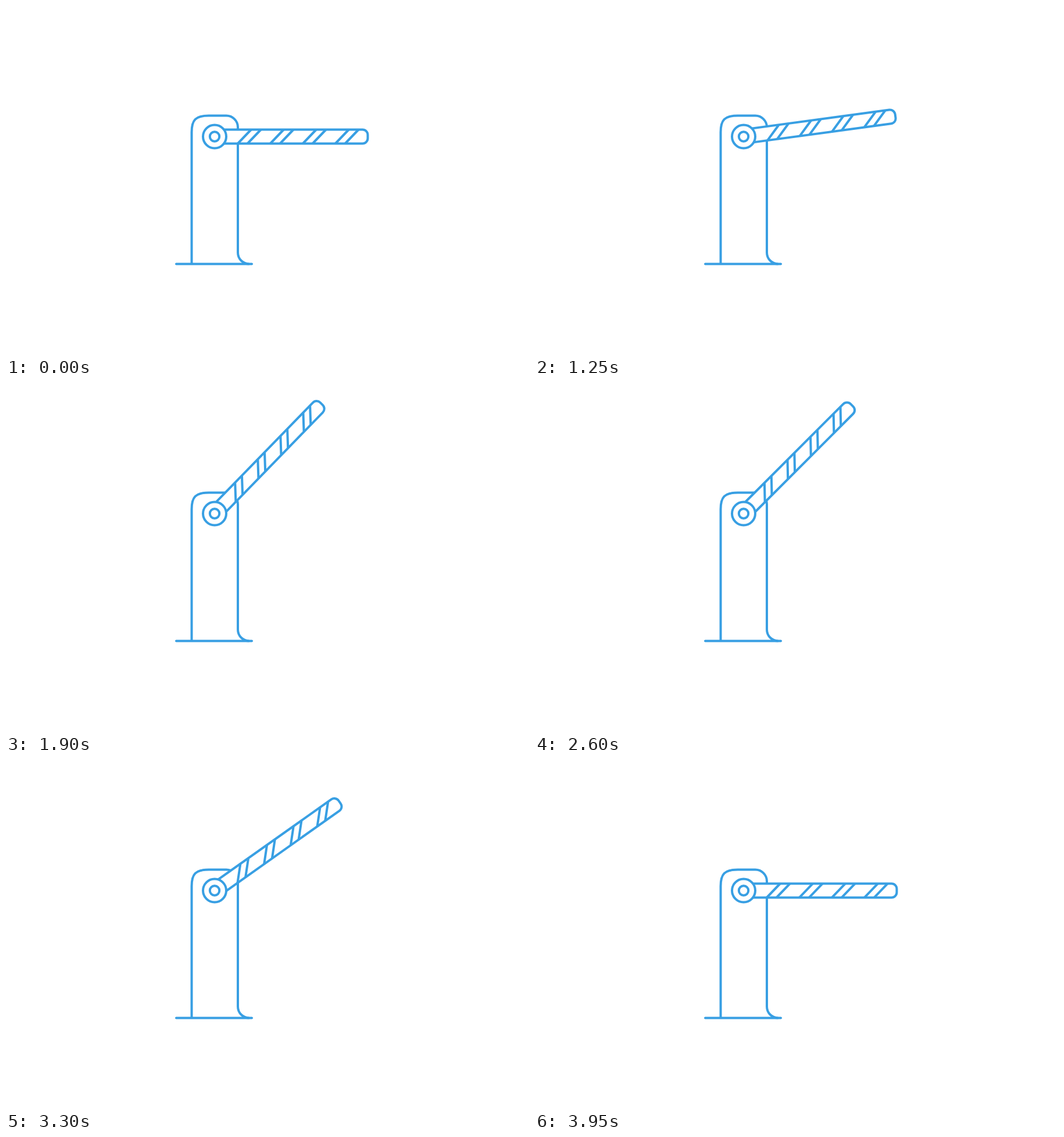
These frames come from a looping animation (900 by 600 pixels, 4.45 s). An HTML page:

```html
<!DOCTYPE html>
<html lang="en">
<head>
<meta charset="utf-8">
<title>Barrier</title>
<style>
  html, body { margin: 0; width: 100%; height: 100%; overflow: hidden; background: #fff; }
  svg { display: block; width: 100%; height: 100%; }
</style>
</head>
<body>
<svg viewBox="0 0 900 600" fill="#fff" stroke="#389fe3" stroke-width="4">
  <path d="M319.5 443.5V217C319.5 196 326 188.5 349 188.5H379A20 20 0 0 1 399 208.5V424A19.5 19.5 0 0 0 418.5 443.5"/>
  <path d="M293 443.5H423" stroke-linecap="round"/>
  <g id="bar">
    <path d="M359 212.5H613.5A9 9 0 0 1 622.5 221.5V227.5A9 9 0 0 1 613.5 236.5H359"/>
    <path id="stripes"/>
  </g>
  <circle cx="359" cy="224.5" r="20"/>
  <circle cx="359" cy="224.5" r="8.2"/>
</svg>
<script>
  const LOOP = 4450, STEP = 50;
  const bar = document.getElementById('bar');

  let stripes = '';
  for (let i = 0; i < 4; i++)
    for (const gap of [0, 16.8]) stripes += `M${398.8 + i * 56 + gap} 236.5l23 -24`;
  document.getElementById('stripes').setAttribute('d', stripes);

  // Easing curve through (0,0), (x1,0), (x2,1), (1,1), solved by bisection.
  function ease(u, x1, x2) {
    let lo = 0, hi = 1;
    for (let i = 0; i < 24; i++) {
      const s = (lo + hi) / 2, r = 1 - s;
      if (3 * r * r * s * x1 + 3 * r * s * s * x2 + s ** 3 < u) lo = s; else hi = s;
    }
    return lo * lo * (3 - 2 * lo);
  }

  const SWING = [0.59, 0.73], SETTLE = [0.28, 0.4];
  // start, end, from angle, to angle, curve
  const moves = [
    [950, 1750, 0, 47, SWING],
    [1750, 2080, 47, 45, SETTLE],
    [3050, 3650, 45, -2.1, SWING],
    [3650, 3970, -2.1, 0, SETTLE],
  ];

  function angleAt(t) {
    let angle = 0;
    for (const [start, end, from, to, curve] of moves)
      if (t > start) angle = t >= end ? to : from + (to - from) * ease((t - start) / (end - start), ...curve);
    return angle;
  }

  function draw() {
    const t = Math.floor(performance.now() % LOOP / STEP) * STEP;
    bar.setAttribute('transform', `rotate(${-angleAt(t)} 359 224.5)`);
    requestAnimationFrame(draw);
  }
  draw();
</script>
</body>
</html>
```
